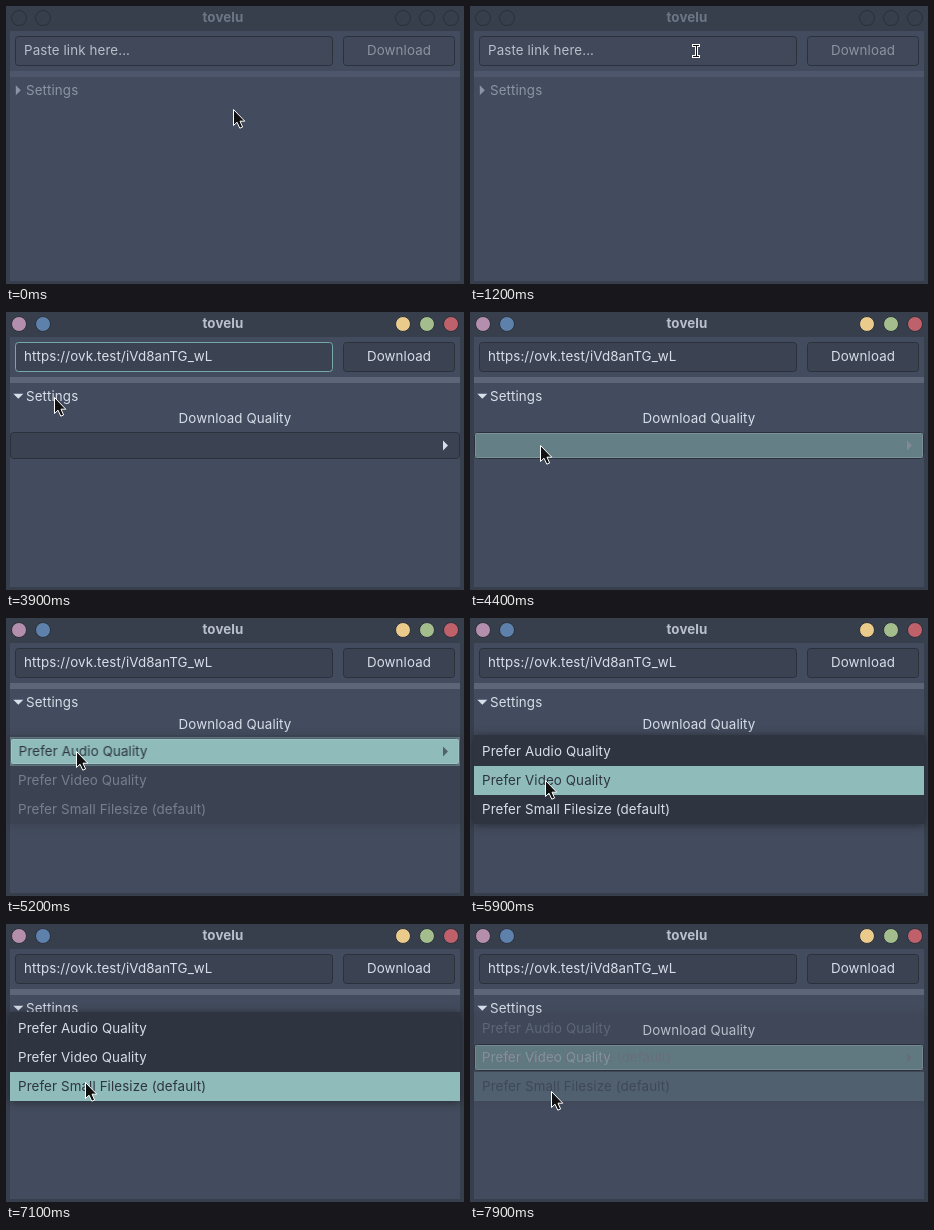
Recreate the animation shown at these times as an HTML page with a canvas. Size 458 by 278 pixels, loop 8 s.

```html
<!DOCTYPE html>
<html lang="en">
<head>
<meta charset="utf-8">
<title>tovelu</title>
<style>
html, body { margin: 0; height: 100%; overflow: hidden; background: #383f4c; }
canvas { display: block; }
</style>
</head>
<body>
<canvas id="stage" width="458" height="278"></canvas>
<script>
const stage = document.getElementById('stage');
const layer = document.createElement('canvas');
layer.width = stage.width;
layer.height = stage.height;
const screen2d = stage.getContext('2d'), layer2d = layer.getContext('2d');
let ctx = screen2d;

const LOOP = 8000, TICK = 100, FADE = 100, ROW = 29, COMBO_TOP = 119;
const FOCUS = 1400, PASTE = 2400, EXPAND = 3700, CLICK = 4400;
const LINK = 'https://ovk.test/iVd8anTG_wL';
const CHOICES = ['Prefer Audio Quality', 'Prefer Video Quality', 'Prefer Small Filesize (default)'];
const BAR = '#383f4c', PANEL = '#434c5e', FIELD = '#3b4252', EDGE = '#2b303b';
const LIGHT = '#d8dee9', DARK = '#2e3440', TEAL = '#8fbcbb';
const BUTTONS = ['#b48ead', '#5e81ac', '#ebcb8b', '#a3be8c', '#bf616a'];

// Each popup opens with the current choice lying over the combo box
const POPUPS = [
  { open: 4500, close: 5200, current: 0, pick: 0 },
  { open: 5500, close: 6400, current: 0, pick: 1 },
  { open: 6800, close: 7850, current: 1, pick: 2 }];

const START = [227, 103];
const MOVES = [
  { from: 600, until: 1200, to: [226, 45] },
  { from: 2800, until: 3500, to: [45, 79] },
  { from: 3800, until: 4300, to: [70, 133] },
  { from: 5700, until: 5900, to: [75, 162] },
  { from: 6400, until: 6700, to: [76, 135] },
  { from: 6900, until: 7100, to: [79, 158] },
  { from: 7100, until: 7200, to: [81, 181] },
  { from: 7300, until: 7400, to: [81, 167] }];

const ramp = (t, from, until) => Math.min(1, Math.max(0, (t - from) / (until - from)));
const smooth = k => k * k * (3 - 2 * k);

function pointerAt(t) {
  return MOVES.reduce((pos, { from, until, to }) => {
    const k = smooth(ramp(t, from, until));
    return pos.map((v, i) => v + (to[i] - v) * k);
  }, START).map(Math.round);
}

// The combo box lights up just before its popup and fades once it closes
function pressAt(t) {
  return Math.max(...POPUPS.map(({ open, close }) =>
    ramp(t, open - 200, open) * (1 - ramp(t, close, close + 1.2 * FADE))));
}

function mix(a, b, k) {
  const part = (hex, i) => parseInt(hex.slice(i, i + 2), 16);
  return `rgb(${[1, 3, 5].map(i => Math.round(part(a, i) + (part(b, i) - part(a, i)) * k))})`;
}

function text(str, x, y, color, align = 'left', weight = 400) {
  ctx.font = `${weight} 13.33px Inter, sans-serif`;
  ctx.letterSpacing = '0.12px';
  ctx.textAlign = align;
  ctx.fillStyle = color;
  ctx.fillText(str, x, y);
}

function rect(x, y, w, h, color) {
  ctx.fillStyle = color;
  ctx.fillRect(x, y, w, h);
}

function paint(fill, edge) {
  ctx.fillStyle = fill;
  ctx.fill();
  ctx.lineWidth = 1;
  ctx.strokeStyle = edge;
  ctx.stroke();
}

function box(x, y, w, h, fill, edge = EDGE) {
  ctx.beginPath();
  ctx.roundRect(x + .5, y + .5, w - 1, h - 1, 3);
  paint(fill, edge);
}

function triangle(x, y, color, down) {
  ctx.beginPath();
  for (const [along, across] of [[-2.5, -5], [2.5, 0], [-2.5, 5]]) {
    ctx.lineTo(x + (down ? across : along), y + (down ? along : across));
  }
  ctx.fillStyle = color;
  ctx.fill();
}

function drawWindow(active) {
  rect(0, 0, 458, 278, BAR);
  rect(4, 25, 450, 250, PANEL);
  text('tovelu', 217, 16, mix('#6d7686', '#b9c0cc', active), 'center', 700);
  BUTTONS.forEach((color, i) => {
    ctx.beginPath();
    ctx.arc((i < 2 ? 13 : 349) + 24 * i, 12, 7.5, 0, 7);
    paint(mix(BAR, color, active), EDGE);
  });
}

function drawForm(t, active) {
  const fill = mix('#404859', FIELD, active);
  const label = mix('#8c94a3', LIGHT, active);
  box(9, 30, 318, 30, fill, t < CLICK ? mix(EDGE, '#76a8aa', active) : EDGE);
  const content = t < FOCUS ? 'Paste link here...' : t < PASTE ? '' : LINK;
  text(content, 18, 49, t < FOCUS ? '#b8bfcb' : LIGHT);
  if (t >= FOCUS && t < 3100) rect(Math.round(18 + ctx.measureText(content).width), 37, 1, 16, LIGHT);
  box(337, 30, 112, 30, fill);
  text('Download', 393, 49, label, 'center');
  rect(4, 65, 450, 6, mix('#4d566a', '#5d6678', active));
  triangle(12.3, 84.3, label, t >= EXPAND);
  text('Settings', 20, 89, label);
  if (t >= EXPAND) drawCombo(t);
}

function drawCombo(t) {
  const press = pressAt(t);
  const ink = mix(LIGHT, DARK, press);
  text('Download Quality', 229, 111, LIGHT, 'center');
  box(4, COMBO_TOP + 1, 450, 27, mix(FIELD, TEAL, press));
  if (t >= CLICK) {
    ctx.setLineDash([1, 1]);
    ctx.strokeStyle = `rgba(216,222,233,${.1 + .6 * press})`;
    ctx.strokeRect(5.5, COMBO_TOP + 2.5, 447, 24);
    ctx.setLineDash([]);
  }
  const done = POPUPS.filter(p => t >= p.close).at(-1);
  if (done) text(CHOICES[done.pick], 13, 138, ink);
  triangle(439.5, 133.5, ink);
}

function drawPopup(t, pointerY) {
  const popup = POPUPS.find(p => t >= p.open && t < p.close + FADE);
  if (!popup) return;
  const { open, close, current } = popup;
  const top = COMBO_TOP - current * ROW;
  const hover = Math.floor((pointerY - top) / ROW);

  // Compose opaque, then blend the whole popup at once
  ctx = layer2d;
  ctx.clearRect(0, 0, layer.width, layer.height);
  ctx.shadowColor = 'rgba(0,0,0,.45)';
  ctx.shadowBlur = 9;
  ctx.shadowOffsetY = 1;
  rect(4, top - 2, 450, 3 * ROW + 2, DARK);
  ctx.shadowColor = 'transparent';
  CHOICES.forEach((choice, i) => {
    const y = top + i * ROW;
    if (i === hover) rect(4, y, 450, ROW, TEAL);
    text(choice, 12, y + 19, i === hover ? DARK : LIGHT);
  });
  ctx = screen2d;
  ctx.globalAlpha = t < close ? Math.min(1, .6 + (t - open) / 250) : .35 * (1 - (t - close) / FADE);
  ctx.drawImage(layer, 0, 0);
  ctx.globalAlpha = 1;
}

function drawPointer([x, y]) {
  if (y < 60) {
    for (const [color, pad] of [['#fff', 1], ['#111', 0]]) {
      for (const [w, h, dy] of [[6, 1, -6], [1, 12, -6], [6, 1, 5]]) {
        rect(x - (w >> 1) - pad, y + dy - pad, w + 2 * pad, h + 2 * pad, color);
      }
    }
    return;
  }
  ctx.beginPath();
  for (const [dx, dy] of [[.5, .5], [.5, 16.5], [4, 13.2], [6.8, 19.2], [9.6, 18], [7, 12.2], [11.8, 12.2]]) {
    ctx.lineTo(x + dx, y + dy);
  }
  ctx.closePath();
  paint('#111', '#fff');
}

function draw(t) {
  const active = ramp(t, FOCUS - TICK, FOCUS + 2 * TICK);
  const pointer = pointerAt(t);
  drawWindow(active);
  drawForm(t, active);
  drawPopup(t, pointer[1]);
  drawPointer(pointer);
}

let start;
function frame(now) {
  start ??= now;
  draw(Math.floor((now - start) % LOOP / TICK) * TICK);
  requestAnimationFrame(frame);
}
draw(0);
requestAnimationFrame(frame);
</script>
</body>
</html>
```
